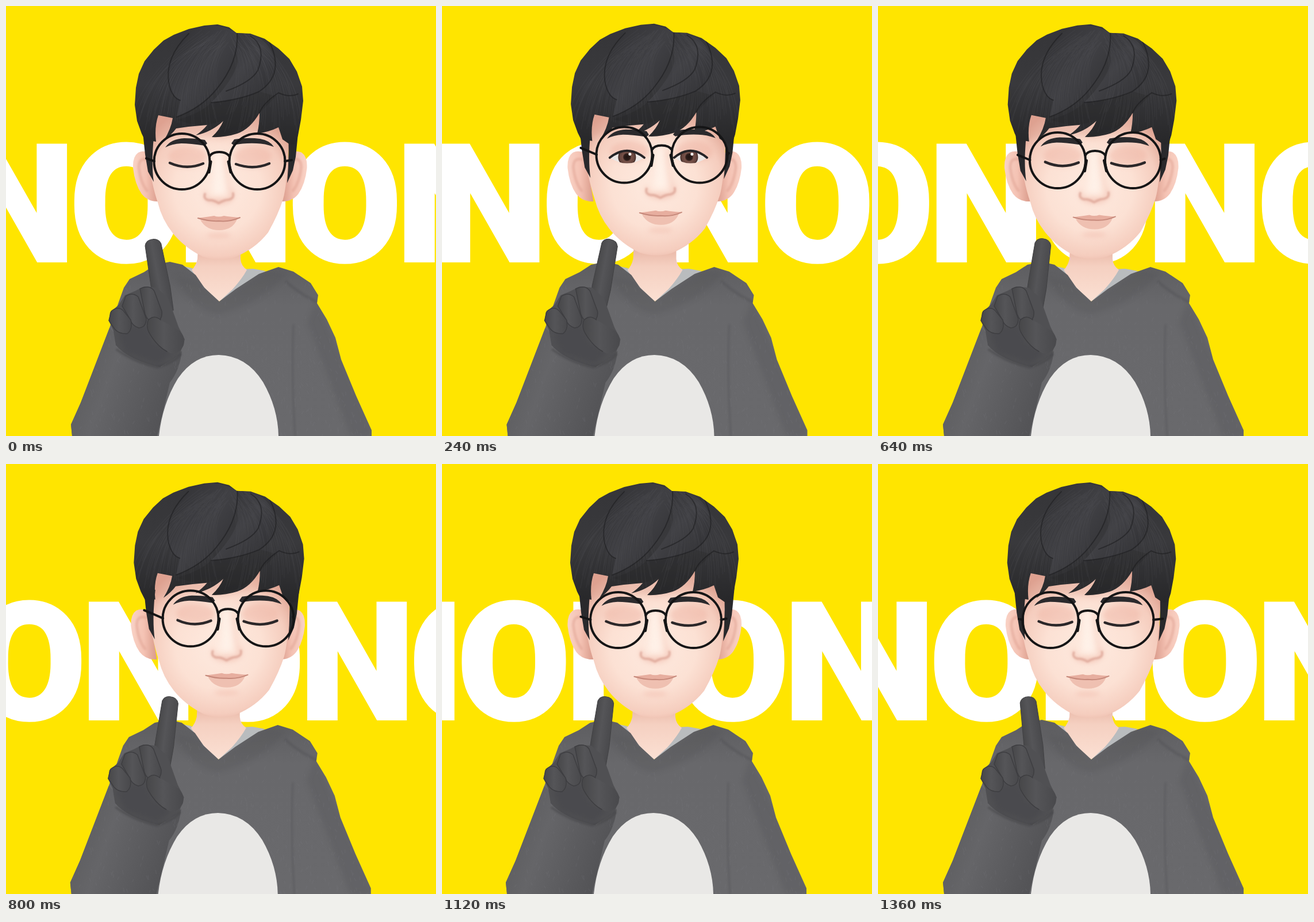
Write an HTML page that moves like this. It is 748 by 748 pixels and loops after 1.44 s.

```html
<!DOCTYPE html>
<html lang="en">
<head>
<meta charset="utf-8">
<title>No no</title>
<style>
html, body { margin: 0; width: 100%; height: 100%; overflow: hidden; background: #ffe500; }
svg { display: block; width: 100vw; height: 100vh; }
.word { font: 900 285px Roboto, sans-serif; fill: #fff; stroke: #fff; stroke-width: 4; text-anchor: middle; }
.line { fill: none; stroke-linecap: round; stroke-linejoin: round; }
</style>
</head>
<body>
<svg viewBox="0 0 748 748" preserveAspectRatio="xMidYMid meet">
  <defs>
    <radialGradient id="skin" gradientUnits="userSpaceOnUse" cx="368" cy="318" r="150">
      <stop offset="0" stop-color="#feeadf"/><stop offset=".5" stop-color="#fce1d4"/>
      <stop offset=".78" stop-color="#f5cdbe"/><stop offset="1" stop-color="#e0a493"/>
    </radialGradient>
    <linearGradient id="neckSkin" x1="0" x2="0" y1="0" y2="1">
      <stop offset="0" stop-color="#e8b5a4"/><stop offset=".35" stop-color="#f5d0c1"/>
      <stop offset="1" stop-color="#fbe0d3"/>
    </linearGradient>
    <linearGradient id="earSkin">
      <stop offset="0" stop-color="#f9d2c5"/><stop offset=".5" stop-color="#f4c2b3"/>
      <stop offset="1" stop-color="#d99a8a"/>
    </linearGradient>
    <linearGradient id="hairTone" x1="0" x2="0" y1="0" y2="1">
      <stop offset="0" stop-color="#353538"/><stop offset=".5" stop-color="#39393c"/>
      <stop offset="1" stop-color="#272729"/>
    </linearGradient>
    <linearGradient id="lockTone" x1="0" x2="1" y1="0" y2="1">
      <stop offset="0" stop-color="#303033"/><stop offset=".5" stop-color="#404044"/>
      <stop offset="1" stop-color="#2d2d30"/>
    </linearGradient>
    <linearGradient id="cloth" x1="0" x2="0" y1="0" y2="1">
      <stop offset="0" stop-color="#5d5d60"/><stop offset=".25" stop-color="#68686b"/>
      <stop offset="1" stop-color="#69696c"/>
    </linearGradient>
    <linearGradient id="sleeve" x1="0" x2="1" y1="0" y2=".35">
      <stop offset="0" stop-color="#58585a"/><stop offset=".45" stop-color="#656568"/>
      <stop offset="1" stop-color="#535356"/>
    </linearGradient>
    <linearGradient id="glove">
      <stop offset="0" stop-color="#474749"/><stop offset=".45" stop-color="#555558"/>
      <stop offset="1" stop-color="#49494c"/>
    </linearGradient>
    <radialGradient id="iris">
      <stop offset="0" stop-color="#1f1412"/><stop offset=".35" stop-color="#2e1d1a"/>
      <stop offset=".5" stop-color="#785249"/><stop offset=".85" stop-color="#63433c"/>
      <stop offset="1" stop-color="#38231f"/>
    </radialGradient>
    <filter id="soft" x="-50%" y="-50%" width="200%" height="200%"><feGaussianBlur stdDeviation="5"/></filter>
    <filter id="blend" x="-50%" y="-50%" width="200%" height="200%"><feGaussianBlur stdDeviation="1.500"/></filter>
    <path id="hairShape" d="M236 222L228 200 224 172 226 142 231 118 241 96 257 76 274 60 292 50 318 40 345 34 368 32 388 37 401 47 425 48 450 57 474 74 493 92 506 114 515 140 517 165 513 198 508 225 503 240 494 241 481 232 474 211Q458 219 437 222Q441 205 441 186Q425 214 402 222Q380 229 358 228Q372 215 378 200Q358 219 330 225Q343 216 350 207Q322 209 296 213Q288 224 275 233Q287 214 290 195L265 190Q258 210 261 236L250 234 243 236Z"/>
    <path id="bodyShape" d="M115 748L113 728 130 690 155 625 180 560 205 490 215 475 240 463 260 450 285 445 307 450 330 468 345 490 371 514 400 492 440 466 474 454 500 462 530 482 543 503 541 517 558 545 573 577 583 615 609 678 636 738V748Z"/>
    <path id="faceShape" d="M252 180L253 300Q258 325 264 342Q271 371 290 395Q310 420 342 436Q370 445 398 437Q433 423 456 394Q474 362 482 336Q492 300 494 180Z"/>
    <clipPath id="hairClip"><use href="#hairShape"/></clipPath>
    <clipPath id="bodyClip"><use href="#bodyShape"/></clipPath>
    <clipPath id="faceClip"><use href="#faceShape"/></clipPath>
    <clipPath id="eyeL"><path id="lidL"/></clipPath>
    <clipPath id="eyeR"><path id="lidR"/></clipPath>
  </defs>

  <rect width="748" height="748" fill="#ffe500"/>
  <g id="words" class="word"></g>

  <g id="ears">
    <path id="ear" fill="url(#earSkin)" d="M252 256Q240 250 230 255Q220 262 221 282Q224 310 236 327Q247 341 266 340Z"/>
    <path id="fold" class="line" stroke="#dfa293" stroke-width="5" opacity=".5" filter="url(#blend)" d="M246 267Q231 263 231 281Q234 307 245 321"/>
    <g transform="translate(744.500 0) scale(-1 1)"><use href="#ear"/><use href="#fold"/></g>
  </g>

  <g id="torso">
    <path fill="#b9bcbe" d="M310 453L324 456 371 514 340 492ZM408 458L430 457 452 461 440 470 371 514Z"/>
    <path fill="url(#neckSkin)" d="M334 420L333 440Q330 453 323 459Q336 480 350 495L371 514 394 493Q411 474 419 459Q409 452 408 440V420Z"/>
    <use href="#bodyShape" fill="url(#cloth)"/>
    <g clip-path="url(#bodyClip)">
      <path fill="#4b4b4e" opacity=".2" filter="url(#soft)" d="M292 470Q330 535 372 535Q440 520 490 465L455 460 371 513 335 477Z"/>
      <path fill="#505053" opacity=".25" filter="url(#soft)" d="M540 512L640 748H600L525 550Z"/>
      <path class="line" stroke="#58585b" stroke-width="4" opacity=".4" filter="url(#blend)" d="M500 556Q496 640 503 748"/>
      <path class="line" stroke="#4f4f52" stroke-width="5" opacity=".35" filter="url(#blend)" d="M488 480Q510 500 541 515"/>
    </g>
    <path fill="url(#sleeve)" d="M115 748L113 728 130 690 155 625 180 560 200 580 270 628 306 600Q302 634 285 655Q275 698 263 748Z"/>
    <path id="fur" class="line" stroke="#828285" stroke-width="1.400" opacity=".15" clip-path="url(#bodyClip)"/>
    <path fill="#e9e8e6" d="M266 748Q272 692 299 648Q327 607 370 607Q418 608 447 654Q473 699 474 748Z"/>
  </g>

  <g id="head">
    <use href="#faceShape" fill="url(#skin)"/>
    <path fill="#d99f8e" opacity=".35" filter="url(#soft)" clip-path="url(#faceClip)" d="M252 180H494V226Q440 214 374 230Q310 218 252 236Z"/>
    <path fill="#29292c" d="M237 210L242 258 247 288 257 306Q252 270 258 220ZM509 212L504 262 499 286 489 308Q493 265 491 222Z"/>
  </g>

  <g id="features">
    <g filter="url(#soft)" fill="#eeb3a3" opacity=".5">
      <ellipse cx="316" cy="262" rx="34" ry="18"/><ellipse cx="429" cy="262" rx="33" ry="18"/>
      <ellipse cx="370" cy="399" rx="22" ry="4"/>
      <path d="M345 318Q340 338 353 342Q370 350 388 342Q401 337 396 318L388 334H352Z"/>
      <path opacity=".5" d="M385 262Q384 300 397 322L388 332Q380 300 377 262Z"/>
    </g>
    <path fill="#fff4ec" opacity=".7" filter="url(#soft)" d="M362 255H376L381 322Q370 332 360 322Z"/>
    <path class="line" stroke="#d08f80" stroke-width="4" opacity=".55" filter="url(#blend)" d="M346 327Q343 336 353 338Q360 337 370 343Q380 337 387 337Q397 335 395 326"/>
    <path fill="#e7ae9f" d="M332 369Q350 367 362 365Q370 368 379 365Q391 367 408 368Q398 374 371 377Q345 375 332 369Z"/>
    <path fill="#efc0b1" d="M338 372Q370 378 402 371Q394 390 371 390Q348 390 338 372Z"/>
    <path class="line" stroke="#bd7f71" stroke-width="2" opacity=".8" d="M334 369Q354 375 370 374Q389 376 407 368"/>

    <g id="closed" class="line" stroke="#2b2729" stroke-width="4.500">
      <path d="M285 273Q314 286 343 274"/>
      <path d="M400 275Q430 286 458 274"/>
    </g>
    <g id="open">
      <g clip-path="url(#eyeL)">
        <rect x="276" y="250" width="72" height="45" fill="#ece7e5"/>
        <circle cx="312" cy="272" r="15.500" fill="url(#iris)"/><circle cx="317" cy="267" r="2.500" fill="#fff"/>
      </g>
      <g clip-path="url(#eyeR)">
        <rect x="388" y="250" width="75" height="45" fill="#ece7e5"/>
        <circle cx="420" cy="272" r="15.500" fill="url(#iris)"/><circle cx="425" cy="267" r="2.500" fill="#fff"/>
      </g>
      <path id="lashL" class="line" stroke="#252326" stroke-width="4"/>
      <path id="lashR" class="line" stroke="#252326" stroke-width="4"/>
    </g>
    <g id="brows" fill="#2b2a2d">
      <path d="M277 246Q287 231 310 230Q330 230 346 233L350 239 346 243Q320 239 305 239Q288 240 277 246Z"/>
      <path d="M392 239L397 232Q420 228 442 231Q459 234 466 245Q450 239 436 239Q415 238 396 242Z"/>
    </g>
  </g>

  <g id="hair">
    <use href="#hairShape" fill="url(#hairTone)"/>
    <g clip-path="url(#hairClip)">
      <path fill="url(#lockTone)" d="M318 48Q274 91 284 138Q290 160 303 164L297 193Q340 177 366 145Q405 98 402 47Q355 20 318 48Z"/>
      <path fill="url(#lockTone)" d="M402 47Q455 47 466 92Q470 130 440 149Q405 164 357 168Q395 130 403 98Z"/>
      <path fill="#202023" opacity=".25" d="M357 168Q408 164 441 149L470 157 441 186Q420 220 358 228L378 198Q345 215 298 198Q340 186 357 168Z"/>
      <path id="strands" class="line" stroke="#5c5c60" stroke-width="1" opacity=".2"/>
      <path class="line" stroke="#19191b" stroke-width="2" opacity=".5" d="M318 48Q274 91 284 138Q290 160 303 164M402 47Q405 98 366 145Q340 177 297 193M425 52Q454 70 438 112Q427 132 383 148M458 62Q486 119 440 149Q405 164 357 168M441 186Q446 170 474 151Q493 160 508 153"/>
    </g>
  </g>

  <g id="glasses" class="line" stroke="#151516" stroke-width="4">
    <circle cx="306" cy="270.500" r="48.500"/>
    <circle cx="437" cy="270.500" r="48.500"/>
    <path d="M354 262Q358 254 371 254Q384 254 389 262"/>
    <path stroke-width="5" d="M356 271L353 289M387 271L391 289"/>
    <path id="arms"/>
  </g>

  <g id="hand">
    <path id="finger" fill="url(#glove)" stroke="#424244" d="M260 413Q263 404 273 404Q285 404 288 414L290 490 288 532 262 530 257 490Z"/>
    <path fill="#505053" d="M262 490L240 488 224 496 207 503 196 520 181 533 179 548 187 565 191 590Q214 616 268 628L302 607 311 580 300 558 290 530 282 508Z"/>
    <path fill="#434346" opacity=".4" filter="url(#soft)" d="M195 570Q220 550 245 556L258 585 290 602 265 624 207 603Z"/>
    <g fill="url(#glove)" stroke="#3e3e41" stroke-width="1.500">
      <path d="M233 492Q250 484 258 496L271 531Q273 545 261 551Q247 551 242 536Z"/>
      <path d="M208 505Q220 497 230 506L244 544Q244 559 231 560Q219 556 216 545L202 522Z"/>
      <path d="M183 531Q195 521 204 530L217 546Q221 562 211 570Q197 571 189 562L179 547Z"/>
    </g>
    <path fill="url(#glove)" d="M247 547Q257 536 269 546L302 565Q313 576 309 590Q302 606 286 604Q263 592 250 570Q243 559 247 547Z"/>
    <path class="line" stroke="#3e3e41" stroke-width="1.500" d="M269 546Q257 536 247 547Q243 559 250 570Q263 592 280 601"/>
    <path class="line" stroke="#3d3d40" stroke-width="4" opacity=".4" filter="url(#blend)" d="M193 598Q225 620 263 628Q290 622 304 606"/>
  </g>
</svg>
<script>
const LOOP = 1440, STEP = 80, PITCH = 380;
const $ = id => document.getElementById(id);
const move = (id, x, y = 0) => $(id).setAttribute('transform', `translate(${x.toFixed(2)} ${y.toFixed(2)})`);

// time, face x, face y, ears x, hair x, body x
const poses = [
  [0, 0, 0, 0, 0, 0],
  [240, 11, -11.5, -2.5, 1, -.5],
  [400, -2, -2.5, 1, 2, 0],
  [640, 6.5, -2, -1, 2, 0],
  [960, 19.5, -1, -5.5, -2, -2.5],
  [1120, .5, 1, -2.5, -1, -2],
  [1360, -6, 1, 1, 1, 0]
];

function poseAt(t) {
  const n = poses.length;
  const key = i => {
    const turn = Math.floor(i / n), p = poses[i - turn * n];
    return [p[0] + turn * LOOP, ...p.slice(1)];
  };
  let i = n - 1;
  while (poses[i][0] > t) i--;
  const [a, b, c, d] = [key(i - 1), key(i), key(i + 1), key(i + 2)];
  const span = c[0] - b[0], u = (t - b[0]) / span;
  return b.slice(1).map((v, j) => {
    const k = j + 1;
    const m0 = (c[k] - a[k]) / (c[0] - a[0]) * span;
    const m1 = (d[k] - b[k]) / (d[0] - b[0]) * span;
    return v + u * m0 + u * u * (3 * (c[k] - v) - 2 * m0 - m1) + u * u * u * (2 * (v - c[k]) + m0 + m1);
  });
}

let seed = 7;
const rand = () => (seed = seed * 16807 % 2147483647) / 2147483647;

function build() {
  let words = '';
  for (let k = -2; k < 3; k++) {
    words += `<text x="${19.5 + k * PITCH}" y="444">N</text><text x="${209.5 + k * PITCH}" y="444">O</text>`;
  }
  $('words').innerHTML = words;

  let strands = '';
  for (let i = 0; i < 90; i++) {
    const x = 222 + i * 3.3, bend = x < 380 ? -32 : 32;
    const sx = 385 + (x - 370) * .3, sy = 42 + rand() * 30;
    strands += `M${sx} ${sy}Q${(x + sx) / 2 + bend} ${95 + rand() * 15} ${x} ${165 + rand() * 55}`;
  }
  $('strands').setAttribute('d', strands);

  let fur = '';
  for (let i = 0; i < 420; i++) {
    const x = 115 + rand() * 515, y = 480 + rand() * 268;
    fur += `M${x} ${y}l${rand() * 6 - 3} ${3 + rand() * 4}`;
  }
  $('fur').setAttribute('d', fur);
}

function drawEye(side, x0, x1, open) {
  const top = `M${x0} 273Q${(x0 + x1) / 2} ${280 - 31 * open} ${x1} 273`;
  $('lid' + side).setAttribute('d', `${top}Q${(x0 + x1) / 2} ${283 + 10 * open} ${x0} 273Z`);
  $('lash' + side).setAttribute('d', top);
}

function render(t) {
  const [fx, fy, ear, hair, body] = poseAt(t);
  move('words', PITCH * t / LOOP);
  move('ears', ear);
  move('torso', body);
  move('head', fx * .12, fy * .6);
  move('features', fx * .9, fy * .8);
  move('glasses', fx, fy);
  move('hand', body);

  // the hair looks wider as the head turns
  const wide = 1 + fx * fx / 20000;
  $('hair').setAttribute('transform', `translate(${370 + hair} ${fy * .1}) scale(${wide} 1) translate(-370 0)`);

  const open = Math.max(0, 1 - Math.abs(t - 240) / 160);
  $('closed').style.display = open ? 'none' : '';
  $('open').style.display = open ? '' : 'none';
  drawEye('L', 282, 342, open);
  drawEye('R', 394, 451, open);
  $('brows').setAttribute('transform', `translate(0 ${-6 * open})`);

  $('arms').setAttribute('d',
    `M258 270L${244 + ear - fx} ${265 - fx * .6}M485 270L${497 + ear - fx * .6} ${268 - fx * .05}`);

  const wag = Math.cos(2 * Math.PI * t / 480);
  const angle = -10.5 * Math.sin(wag * Math.PI / 2);
  $('finger').setAttribute('transform', `rotate(${angle} 274 513)`);
}

function tick() {
  render(Math.floor(performance.now() % LOOP / STEP) * STEP);
  requestAnimationFrame(tick);
}

build();
tick();
</script>
</body>
</html>
```
